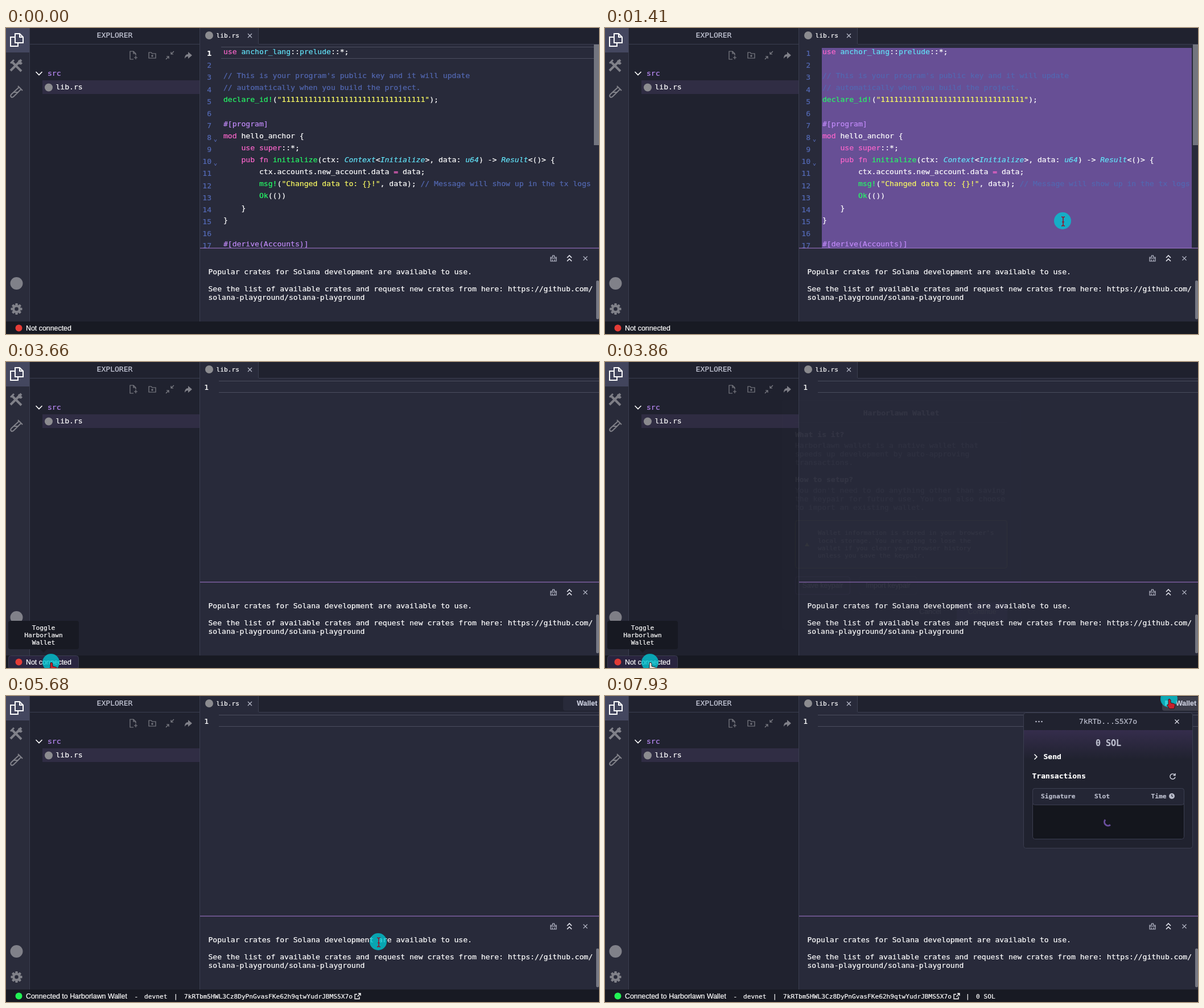
Write an HTML page that moves like this. It is 1042x538 px and loops after 8000 ms.

```html
<!DOCTYPE html>
<html lang="en">
<head>
<meta charset="utf-8">
<title>Code playground</title>
<style>
  html, body { margin: 0; width: 100%; height: 100%; overflow: hidden; background: #20222f; }
  svg { display: block; }
  text { font: 13.05px "DejaVu Sans Mono", monospace; white-space: pre; stroke-width: .22px; }
  .code { font-size: 13.08px; }
  .s { font-size: 11.18px; }
  .a { font: 12.4px "Liberation Sans", Arial, sans-serif; }
  .b { font-weight: bold; }
  .m { text-anchor: middle; }
  .e { text-anchor: end; }
  .big { font-size: 15px; }
  .i { font-style: italic; }
</style>
</head>
<body>
<svg id="stage" width="1042" height="538" viewBox="0 0 1042 538"></svg>
<script>
const PANEL = '#20222f', EDITOR = '#282a3a', DARK = '#181a23', LINE = '#3b3e50';
const SOFT = '#b9bccb', GREY = '#808189', PURPLE = '#b98af5', VIOLET = '#674f95', COMMENT = '#5368b2';
const NAME = 'Harborlawn', ADDRESS = '7kRTbm5HWL3Cz8DyPnGvasFKe62h9qtwYudrJBMS5X7o';
const SHORT = ADDRESS.slice(0, 5) + '...' + ADDRESS.slice(-5);
const ROW = 21.12;

const esc = s => s.replace(/&/g, '&amp;').replace(/</g, '&lt;');
const ink = color => `fill="${color}" stroke="${color}"`;
const text = (x, y, s, fill = '#fff', cls = '') =>
  `<text x="${x}" y="${y}" ${ink(fill)} class="${cls}">${esc(s)}</text>`;
const lines = (x, y, step, rows, fill, cls) => rows.map((s, i) => text(x, y + i * step, s, fill, cls)).join('');
const rect = (x, y, w, h, fill, more = '') => `<rect x="${x}" y="${y}" width="${w}" height="${h}" fill="${fill}" ${more}/>`;
const box = (x, y, w, h, fill, stroke, r = 4) =>
  rect(x + .5, y + .5, w - 1, h - 1, fill, `stroke="${stroke}" rx="${r}"`);
const disc = (x, y, r, fill) => `<circle cx="${x}" cy="${y}" r="${r}" fill="${fill}"/>`;
const icon = (x, y, d, stroke = SOFT, w = 1.2, fill = 'none') =>
  `<path transform="translate(${x} ${y})" d="${d}" stroke="${stroke}" stroke-width="${w}" fill="${fill}"/>`;
const group = (id, ...parts) => `<g id="${id}">${parts.join('')}</g>`;
const CROSS = 'M-3.5-3.5l7 7m0-7l-7 7';

// "~x" switches to colour x
const COLORS = { p: '#fb66cb', w: '#fff', k: COMMENT, g: '#25f966', y: '#f8f962', v: '#c18af8', c: '#62e3f8', n: '#62e3f8' };
const CODE = `~puse ~nanchor_lang~w::~nprelude~w::*;

~k// This is your program's public key and it will update
~k// automatically when you build the project.
~gdeclare_id!~w(~y"${'1'.repeat(32)}"~w);

~v#[program]
~pmod ~whello_anchor {
~p    use super~w::*;
~p    pub fn ~ginitialize~w(ctx: ~cContext~w<~cInitialize~w>, data: ~cu64~w) -> ~cResult~w<()> {
~w        ctx.accounts.new_account.data ~p= ~wdata;
~g        msg!~w(~y"Changed data to: {}!"~w, data); ~k// Message will show up in the tx logs
~g        Ok~w(())
~w    }
~w}

~v#[derive(Accounts)]`.split('\n');

const codeLine = (line, i) => `<text x="382" y="${46 + i * ROW}" class="code">` + line.split('~').slice(1).map(p =>
  `<tspan ${ink(COLORS[p[0]])} class="${p[0] == 'c' ? 'i' : ''}">${esc(p.slice(1))}</tspan>`).join('') + '</text>';
const activeRow = (x, y, w) => rect(x, y, w, 1, '#4b4e5f') + rect(x, y + 20, w, 1, '#4b4e5f');
const lineNumber = (i, fill, cls = 'e') => text(361, 49.2 + i * ROW, String(i + 1), fill, cls);
const gear = Array.from({ length: 8 }, (_, i) =>
  rect(-2.2, -10, 4.4, 5, GREY, `rx="1" transform="translate(18.5 494) rotate(${i * 45})"`)).join('');

const sidebar = [
  rect(0, 0, 41, 516, '#2a2c3b'), rect(0, 0, 41, 43, '#44475f'), rect(41, 0, 1, 516, LINE),
  icon(19, 21, 'M-3-11h8l6 6v10h-14zM5-11v6h6M-3-5h-8v16h13v-6', '#fff', 2),
  icon(18, 66, 'M-8-7l17 17M9-10l-19 19', GREY, 4),
  icon(18, 66, 'M-10-4l6-6M4-9l6 6M4-4l5 1', GREY, 3),
  icon(18, 111, 'M3-9l8 8M5-7l-14 13q-2 3 1 5q2 0 4-2l13-13M-5 2h9', GREY, 2),
  disc(18.5, 449, 11, GREY),
  gear, `<circle cx="18.5" cy="494" r="5.3" fill="none" stroke="${GREY}" stroke-width="4"/>`,
  rect(42, 0, 298, 516, PANEL), rect(42, 28, 298, 1, LINE),
  text(191, 17, 'EXPLORER', '#c4c7d6', 'm'),
  icon(224, 48, 'M0 7h-6v-14h6l4 4v3M0-7v4h4M1 4h6M4 1v6', GREY),
  icon(257, 48, 'M-6-5h4l2 2h6v8h-12zM-2 1h4M0-1v4', GREY),
  icon(288, 48, 'M7-7l-5 5M2-6v4h4M-7 7l5-5M-6 2h4v4', GREY),
  icon(320, 48, 'M-6 6q0-8 6-8v-4l7 6-7 6v-4q-4 0-6 4z', 'none', 0, GREY),
  icon(58, 80, 'M-5.5-3l5.5 5.5 5.5-5.5', '#fff', 1.6), text(73, 84.3, 'src', PURPLE),
  rect(64, 92, 276, 24, '#302d44'), disc(75, 104.5, 7, '#8c8c90'), text(87.5, 108.3, 'lib.rs'),
];

const editor = [
  rect(340, 0, 702, 28, PANEL), rect(341, 0, 103, 28, EDITOR),
  rect(340, 28, 702, 359, EDITOR), rect(444, 28, 598, 1, LINE), rect(443, 0, 1, 28, LINE),
  disc(357, 13, 7, '#8c8c90'), text(369.5, 17, 'lib.rs', '#fff', 's'), icon(428.5, 13.5, CROSS),
  group('code',
    group('rowFirst', activeRow(378, 33, 655)),
    group('rowClicked', activeRow(378, 327, 655)),
    group('selection', rect(381, 35, 650, 352, VIOLET)),
    CODE.map(codeLine).join(''),
    CODE.map((_, i) => lineNumber(i, COMMENT)).join(''),
    group('numFirst', rect(350, 37, 12, 15, EDITOR), lineNumber(0, '#fff', 'e b')),
    group('numClicked', lineNumber(14, '#fff')),
    icon(368, 198, 'M-2-2l2 4 2-4', COMMENT, 1), icon(368, 240, 'M-2-2l2 4 2-4', COMMENT, 1),
    rect(1033, 29, 9, 177, '#73757f')),
  group('empty', activeRow(374, 33, 668), text(356, 49, '1', '#fff', 'e')),
  rect(0, 0, 1.5, 16, '#e8e8ee', 'id="caret"'),
  rect(340, 0, 1, 516, LINE),
];

const terminal = [
  rect(341, 387, 701, 129, EDITOR), rect(341, 386.5, 701, 1, '#a77bd6'),
  icon(962, 405, 'M-5 5v-5h10v5zM-5 0v-2h3.5v-3h3v3h3.5v2M-2 5v-3M2 5v-3'),
  icon(990, 405, 'M-4-1l4-4 4 4M-4 5l4-4 4 4', '#e4e5ee', 1.7), icon(1018, 405, CROSS),
  text(355.5, 432.5, 'Popular crates for Solana development are available to use.'),
  lines(355.5, 462.5, 15, ['See the list of available crates and request new crates from here: https://github.com/',
    'solana-playground/solana-playground']),
  rect(1037, 444, 5, 68, '#777984', 'rx="2"'),
];

const status = [
  rect(0, 516, 1042, 22, DARK),
  group('hover', box(4, 516, 124, 24, '#2a2540', LINE)),
  group('offline', disc(22.5, 527.5, 6, '#e53c37'), text(35, 531.5, 'Not connected', '#fff', 'a')),
  group('online', disc(22.5, 527.5, 6, '#22f355'), text(35, 531.5, `Connected to ${NAME} Wallet`, '#fff', 'a'),
    text(225.5, 531.5, '-', '#fff', 's'), text(243, 531.5, 'devnet', '#fff', 's'),
    text(295, 531.5, '|', '#fff', 's'), text(313, 531.5, ADDRESS, '#fff', 's'),
    icon(618, 527.5, 'M-1-3h-4v8h8v-4M1-4.5h4v4M4.5-4l-5 5', '#fff', 1.3)),
  group('balance', text(634, 531.5, '|', '#fff', 's'), text(652, 531.5, '0 SOL', '#fff', 's')),
  group('tooltip', rect(4, 455, 124, 50, DARK, 'rx="4"'), icon(66, 505, 'M-6 0h12l-6 6z', 'none', 0, DARK),
    lines(66, 471, 13, ['Toggle', NAME, 'Wallet'], '#fff', 's m')),
];

const modal = [
  rect(0, 0, 1042, 538, '#000', 'opacity=".37"'),
  box(311, 67, 419, 403, '#20222ff0', LINE),
  text(520.5, 94, `${NAME} Wallet`, '#fff', 'b m'), rect(334, 106, 373, 1, LINE),
  text(334, 132.4, 'What is it?', '#fff', 'b'),
  lines(334, 151, 15, [`${NAME} wallet is a native wallet that`,
    'speeds up development by auto-approving', 'transactions.'], SOFT),
  text(334, 211, 'How to setup?', '#fff', 'b'),
  lines(334, 230, 15, ["You don't need to do anything other than saving",
    'the keypair for future use. You can also choose', 'to import an existing wallet.'], SOFT),
  box(334, 278, 373, 85, EDITOR, '#b9bc40'),
  icon(355, 320.5, 'M0-3.5l4 7h-8z', 'none', 0, '#eff05a'),
  lines(374, 304.3, 13.2, ["Wallet information is stored in your browser's", 'local storage. You are going to lose the',
    'wallet if you clear your browser history', 'unless you save the keypair.'], '#fff', 's'),
  box(334, 377, 97, 32, PANEL, '#a27dd8'), text(382.5, 396.5, 'Save keypair', '#fff', 'a m'),
  box(446, 377, 103, 32, PANEL, LINE), text(497.5, 396.5, 'Import keypair', '#fff', 'a m'),
  text(571.5, 442.5, 'Cancel', '#fff', 'a m'),
  rect(618, 423, 89, 32, VIOLET, 'id="continue" rx="4"'), text(662.5, 442.5, 'Continue', '#fff', 'a m'),
];

const wallet = [
  box(735, 29, 298, 239, PANEL, LINE), rect(736, 60, 296, 52, 'url(#glow)'),
  disc(757.5, 45, 1.3, SOFT), disc(762.5, 45, 1.3, SOFT), disc(767.5, 45, 1.3, SOFT),
  text(884, 48.7, SHORT, SOFT, 'm'), icon(1005, 45, CROSS, '#e4e5ee'),
  text(884.5, 88, '0 SOL', SOFT, 'b m big'),
  icon(757, 107, 'M-2.5-4.5l4.5 4.5-4.5 4.5', '#fff', 1.5), text(770.5, 110.6, 'Send', '#fff', 'b'),
  text(750.5, 145.2, 'Transactions', '#fff', 'b'),
  icon(997.5, 141.5, 'M3.5-3a4.6 4.6 0 1 0 1 4M4.5-5.5v3.5h-3.5', '#d8dae6', 1.4),
  box(751, 162, 267, 90, '#14161d', LINE), box(751, 162, 267, 30, '#242635', LINE),
  text(766, 180, 'Signature', SOFT, 's b'), text(860, 180, 'Slot', SOFT, 's b'), text(959.5, 180, 'Time', SOFT, 's b'),
  disc(996, 176, 5, SOFT), icon(996, 176, 'M0-3v3l2 1', PANEL),
  `<path id="spinner" d="M4 5A6.4 6.4 0 0 1-5-4" fill="none" stroke="#6b4f9e" stroke-width="3"/>`,
];

const stage = document.getElementById('stage');
stage.innerHTML = [
  `<linearGradient id="glow" x2="0" y2="1"><stop stop-color="#352d4c"/><stop offset="1" stop-color="${PANEL}"/></linearGradient>`,
  ...sidebar, ...editor, ...terminal, ...status,
  group('walletButton', rect(979, 1, 66, 25, EDITOR, 'id="walletFace" rx="4"'),
    group('walletIcon', rect(984, 8, 10, 9, '#e8e8ee')),
    text(1003, 17, 'Wallet', '#c9ccdc', 'a b')),
  group('wallet', ...wallet), group('modal', ...modal),
  group('cursor', `<circle id="halo" r="15" fill="#00c8d4" opacity=".78"/>`,
    group('beam', icon(1, 1, 'M-3-8q3 0 3 2v12q0 2-3 2M3-8q-3 0-3 2M3 8q-3 0-3-2M-2 1h4', '#8e1c30', 1.7)),
    group('hand', icon(0, 0, 'M-1 1q2-2 4 1v5l6 1.5q2 .6 1.6 3l-1.6 6h-8l-4.5-6.5q1-2 2.5-.5z', '#2b1a20', 1, 'currentColor'))),
].join('');

const el = {};
stage.querySelectorAll('[id]').forEach(node => el[node.id] = node);
const show = (id, on) => el[id].style.display = on ? '' : 'none';
const clamp = v => Math.max(0, Math.min(1, v));
const fade = (id, v) => { show(id, v > 0); el[id].style.opacity = clamp(v); };

// time, x, y, eased
const PATH = [[150, 850, 500], [640, 804, 339, 1], [2500, 804, 339], [3320, 79, 528, 1], [3980, 79, 528],
  [4130, 263, 453], [4330, 450, 436], [4540, 581, 432], [4820, 654, 432], [6030, 654, 432],
  [6830, 941, 9, 1], [7000, 941, 9], [7300, 991, 5, 1]];

function cursorAt(t) {
  const i = PATH.findIndex(k => k[0] > t);
  if (i < 1) return (i ? PATH[PATH.length - 1] : PATH[0]).slice(1, 3);
  const a = PATH[i - 1], b = PATH[i];
  let u = (t - a[0]) / (b[0] - a[0]);
  if (b[3]) u = u * u * (3 - 2 * u);
  return [a[1] + (b[1] - a[1]) * u, a[2] + (b[2] - a[2]) * u];
}

function draw(t) {
  const clicked = t >= 700 && t < 1410, cleared = t >= 2100, connected = t >= 5680;
  show('code', !cleared);
  show('empty', cleared);
  show('rowFirst', t < 700);
  show('numFirst', t < 700);
  show('rowClicked', clicked);
  show('numClicked', clicked);
  show('selection', t >= 1410);
  show('caret', clicked && t < 1250 || cleared && t < 3600 && (t - 2100) % 1000 < 500);
  el.caret.setAttribute('transform', cleared ? 'translate(377.5 35)' : 'translate(390 330)');

  show('hover', t >= 3300 && t < 4000);
  fade('tooltip', t < 4000 ? (t - 3380) / 200 : 0);
  show('offline', !connected);
  show('online', connected);
  show('balance', t >= 6080);
  fade('modal', connected ? 0 : (t - 3850) / 250);

  // the halo trails the pointer
  const [x, y] = cursorAt(t), [px, py] = cursorAt(t + 45);
  el.continue.setAttribute('fill', px > 618 ? '#7558a8' : VIOLET);

  const onWallet = connected && px > 979;
  show('walletButton', connected);
  show('walletIcon', onWallet);
  el.walletFace.setAttribute('fill', onWallet ? '#3c3d4a' : EDITOR);
  fade('wallet', (t - 7440) / 140);
  el.spinner.setAttribute('transform', `translate(884 221.5) rotate(${(t - 7930) * .72})`);

  const inModal = t >= 3850 && !connected, beam = !inModal && px > 340 && py > 28;
  show('cursor', t >= 150);
  show('beam', beam);
  show('hand', !beam);
  el.halo.setAttribute('transform', `translate(${x} ${y})`);
  el.beam.setAttribute('transform', `translate(${px} ${py})`);
  el.hand.setAttribute('transform', `translate(${px} ${py})`);
  el.hand.style.color = inModal ? '#e6e2dc' : '#c8202c';
}

const start = performance.now();
function tick() {
  draw((performance.now() - start) % 8000);
  requestAnimationFrame(tick);
}
tick();
</script>
</body>
</html>
```
